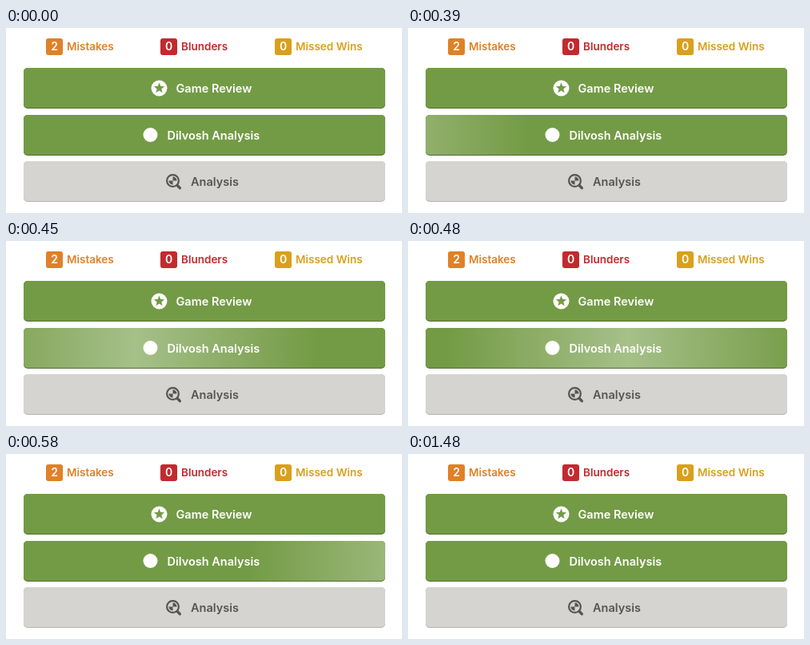
An HTML page with a canvas that plays this animation: 495x232 px, repeating every 1.51 s.

```html
<!DOCTYPE html>
<html lang="en">
<head>
<meta charset="utf-8">
<title>Review buttons</title>
<style>
  html, body { margin: 0; width: 495px; height: 232px; overflow: hidden; background: #fff; }
  canvas { display: block; }
</style>
</head>
<body>
<canvas id="stage" width="495" height="232"></canvas>
<script>
const ctx = document.getElementById('stage').getContext('2d');
const FONT = 'Inter, "Open Sans", sans-serif';
const LOOP = 1510;
const GREEN = '#739b45', GREEN_EDGE = '#506d30';
const GREY = '#d5d4d0', GREY_EDGE = '#b4b3b0', INK = '#565553';
const LEFT = 22, WIDTH = 452, HEIGHT = 51;

// The sheen moves on these ticks and rests in between.
const ticks = [330, 360, 390, 420, 450, 480, 520, 550, 580, 610, 650, 680, 720, 760];
const SHEEN_START = 326, SHEEN_TIME = 500;

function bezier(a, b, s) {
  return 3 * (1 - s) * (1 - s) * s * a + 3 * (1 - s) * s * s * b + s * s * s;
}

// cubic-bezier(.25, .1, .25, 1)
function ease(x) {
  let lo = 0, hi = 1;
  for (let i = 0; i < 24; i++) {
    const mid = (lo + hi) / 2;
    if (bezier(0.25, 0.25, mid) < x) lo = mid; else hi = mid;
  }
  return bezier(0.1, 1, lo);
}

function box(x, y, w, h, r, color) {
  ctx.fillStyle = color;
  ctx.beginPath();
  ctx.roundRect(x, y, w, h, r);
  ctx.fill();
}

function disc(x, y, r, color) {
  ctx.fillStyle = color;
  ctx.beginPath();
  ctx.arc(x, y, r, 0, Math.PI * 2);
  ctx.fill();
}

function text(str, x, y, size, color, align = 'left', weight = 600) {
  ctx.font = `${weight} ${size}px ${FONT}`;
  ctx.textAlign = align;
  ctx.fillStyle = color;
  ctx.fillText(str, x, y);
}

function counter(x, count, label, color) {
  box(x, 13, 21, 21, 3, color);
  text(count, x + 10.5, 28, 14, '#fff', 'center');
  text(label, x + 26, 28, 13.5, color);
}

function button(y, face, edge) {
  box(LEFT, y, WIDTH, HEIGHT, 5, edge);
  box(LEFT, y, WIDTH, HEIGHT - 1, 5, face);
}

function star(x, y) {
  disc(x, y, 10, '#fff');
  ctx.fillStyle = GREEN;
  ctx.beginPath();
  for (let i = 0; i < 10; i++) {
    const r = i % 2 ? 3 : 7;
    const a = i * Math.PI / 5 - Math.PI / 2;
    ctx.lineTo(x + r * Math.cos(a), y + r * Math.sin(a));
  }
  ctx.fill();
}

function magnifier(x, y) {
  ctx.strokeStyle = INK;
  ctx.lineWidth = 2.2;
  ctx.beginPath();
  ctx.arc(x, y, 7.4, 0, Math.PI * 2);
  ctx.stroke();
  ctx.lineWidth = 3.4;
  ctx.lineCap = 'round';
  ctx.beginPath();
  ctx.moveTo(x + 5.8, y + 6);
  ctx.lineTo(x + 8.8, y + 9.2);
  ctx.stroke();
  ctx.fillStyle = INK;
  for (const a of [-Math.PI / 2, Math.PI / 2]) {
    ctx.beginPath();
    ctx.moveTo(x, y);
    ctx.arc(x, y, 5, a, a + Math.PI / 2);
    ctx.fill();
  }
}

function sheen(y, t) {
  const tick = ticks.filter(v => v <= t).pop();
  if (!tick || tick === ticks[ticks.length - 1]) return;
  const x = LEFT - WIDTH + 2 * WIDTH * ease((tick - SHEEN_START) / SHEEN_TIME);
  const glow = ctx.createLinearGradient(x, 0, x + WIDTH, 0);
  glow.addColorStop(0, 'rgba(255,255,255,0)');
  glow.addColorStop(0.5, 'rgba(255,255,255,.37)');
  glow.addColorStop(1, 'rgba(255,255,255,0)');
  box(LEFT, y, WIDTH, HEIGHT - 1, 5, glow);
}

function draw(t) {
  ctx.fillStyle = '#fff';
  ctx.fillRect(0, 0, 495, 232);

  counter(50, '2', 'Mistakes', '#df8127');
  counter(193, '0', 'Blunders', '#c22a2e');
  counter(336, '0', 'Missed Wins', '#d8a01c');

  button(50, GREEN, GREEN_EDGE);
  star(191.5, 75.5);
  text('Game Review', 212.5, 81, 14.5, '#fff');

  button(109, GREEN, GREEN_EDGE);
  sheen(109, t);
  disc(180.5, 134, 9, '#fff');
  text('Dilvosh Analysis', 201.5, 140, 14.5, '#fff');

  button(167, GREY, GREY_EDGE);
  magnifier(208.5, 191.5);
  text('Analysis', 231, 198, 14.5, INK);
}

const start = performance.now();
function loop() {
  draw((performance.now() - start) % LOOP);
  requestAnimationFrame(loop);
}
loop();
</script>
</body>
</html>
```
